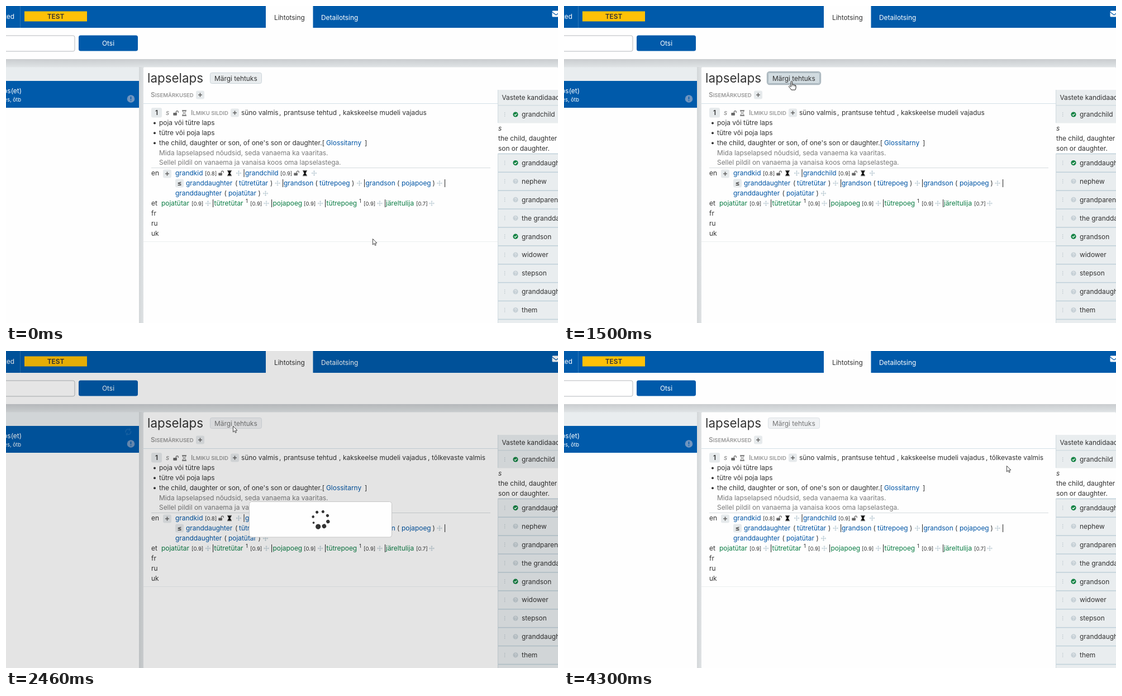
These frames come from a looping animation (988 px wide and 567 px high, 4.81 s). An HTML page:

```html
<!DOCTYPE html>
<html lang="et">
<head>
<meta charset="utf-8">
<title>Lapselaps</title>
<style>
html, body { margin: 0; width: 100%; height: 100%; overflow: hidden; background: #fefefe; }
svg { display: block; width: 100%; height: 100%; }
text { font: 11.9px Inter, sans-serif; fill: #333; white-space: pre; }
.sm { font-size: 9.52px; }
.b { font-weight: 600; }
.i { font-style: italic; }
.w { fill: #fff; }
.l { fill: #0055a5; }
.g { fill: #0b7d45; }
.m { fill: #7b7b7b; }
.cap { fill: #999; font-weight: 600; }
.h { font-size: 22.4px; }
.mid { text-anchor: middle; }
.end { text-anchor: end; }
</style>
</head>
<body>
<svg id="stage" viewBox="0 0 988 567">
  <defs>
    <linearGradient id="drop" x2="0" y2="1">
      <stop offset="0" stop-color="#c9cccf"/><stop offset="1" stop-color="#dfe3e5"/>
    </linearGradient>
    <linearGradient id="gap">
      <stop offset="0" stop-color="#d3d7d9"/><stop offset="1" stop-color="#dfe2e4"/>
    </linearGradient>
    <g id="move" fill="none" stroke="#b9cad3">
      <path d="M-4 0H4M0-4V4" stroke-width="1"/>
      <path d="M-3-1.3L-4.4 0-3 1.3M3-1.3L4.4 0 3 1.3M-1.3-3L0-4.4 1.3-3M-1.3 3L0 4.4 1.3 3"/>
    </g>
    <g id="unlock">
      <rect x="-4.7" y="-.6" width="6.6" height="4.8" rx=".8" fill="#666"/>
      <path d="M.4-.6V-2a1.9 1.9 0 0 1 3.8 0V-.4" fill="none" stroke="#666" stroke-width="1.2"/>
    </g>
    <g id="glass">
      <path d="M-4-4.6H4M-4 4.6H4" stroke="#666" stroke-width="1.4"/>
      <path d="M-3-4C-3-1-1-1-1 0S-3 1-3 4H3C3 1 1 1 1 0S3-1 3-4z" stroke="#666" stroke-width=".8"/>
    </g>
    <g id="plus">
      <rect x="-7.5" y="-7.5" width="15" height="15" rx="3" fill="#e6eaec"/>
      <path d="M-3.5 0H3.5M0-3.5V3.5" stroke="#666" stroke-width="1.7"/>
    </g>
    <g id="ok">
      <circle r="4.6" fill="#158345"/>
      <path d="M-2.2 .1L-.6 1.7 2.3-1.4" fill="none" stroke="#fff" stroke-width="1.3"/>
    </g>
    <g id="ask">
      <circle r="4.6" fill="#c6d0d6"/>
      <path d="M-1.4-1A1.4 1.4 0 1 1 .5 .2Q0 .4 0 1M0 1.9V2.9" fill="none" stroke="#eef1f3"/>
    </g>
    <g id="arrow"><path d="M.5 .5V11L3 8.6 4.6 12.3 6.3 11.6 4.7 8H8z" fill="#fff" stroke="#333" stroke-width=".9"/></g>
    <g id="hand">
      <path d="M-1.2 9V1.2Q-1.2 0 0 0T1.2 1.2V6Q3.2 5 3.8 6.6 5.6 5.9 6 7.2 7.6 7 7.6 8.6V11.5Q7.6 13.5 6.3 15.6H-.5Q-2.2 12.8-4.8 10.2-5.5 9-4.2 8.4-3 8-1.2 10z" fill="#fff" stroke="#222"/>
      <path d="M1.2 6V9M3.8 6.6V9M6 7.2V9.4" stroke="#222" stroke-width=".8"/>
    </g>
  </defs>
</svg>
<script>
const stage = document.getElementById('stage');
const out = [];
const add = s => out.push(s);
const rect = (x, y, w, h, fill, more = '') =>
  add(`<rect x="${x}" y="${y}" width="${w}" height="${h}" fill="${fill}" ${more}/>`);
const text = (x, y, s, cls = '', more = '') =>
  add(`<text x="${x}" y="${y}" class="${cls}" ${more}>${s}</text>`);
const use = (id, x, y, more = '') =>
  add(`<use href="#${id}" transform="translate(${x} ${y})" ${more}/>`);
const line = (x1, x2, y, c) => rect(x1, y, x2 - x1, 1, c);
const smallCaps = (x, y, s) =>
  text(x, y, `${s[0]}<tspan class="sm">${s.slice(1).toUpperCase()}</tspan>`, 'cap');

// One line of words: [kind, x, label]
const row = (y, parts) => parts.forEach(([kind, x, s]) => {
  if (kind === '|') rect(x, y - 11, 1.1, 14, '#333');
  else if (kind === 'move' || kind === 'unlock' || kind === 'glass') use(kind, x, y - 4);
  else if (kind === 'sup') text(x, y - 5, s, 'sm');
  else text(x, y, s, kind);
});

const BLUE = '#005aaa', PANEL = '#e9edef';

function header() {
  rect(0, 0, 988, 567, '#fefefe');
  rect(0, 0, 988, 39, BLUE);
  text(15, 23, 'Filtreeritud'.replace('itud', 'ted'), 'w end');
  rect(25, 0, 1, 39, '#2b76b8');
  rect(33, 9.5, 112, 18, '#ffc107');
  text(89, 23, 'TEST', 'b mid');
  rect(465, 0, 84.5, 39, '#fefefe');
  text(480, 25, 'Lihtotsing');
  text(564, 25, 'Detailotsing', 'w');
  rect(977.5, 8.5, 14, 11, '#fff', 'rx="1.5"');
  add(`<path d="M977 10.5L984.5 16 992 10.5" fill="none" stroke="${BLUE}" stroke-width="1.2"/>`);
  rect(-10, 53, 133, 28, '#fff', 'rx="3" stroke="#b4b8bb"');
  rect(130, 52.5, 106, 28, BLUE, 'rx="3.5"');
  text(183, 71, 'Otsi', 'w mid');
}

function side() {
  rect(0, 95, 988, 472, '#dfe3e5');
  rect(0, 95, 988, 14, 'url(#drop)');
  rect(0, 109.5, 238, 25, PANEL);
  rect(0, 134, 238, 48, BLUE);
  rect(0, 182, 238, 385, '#fefefe');
  rect(238, 109, 8, 458, 'url(#gap)');
  text(28, 156, 'lapselaps(et)', 'w end');
  text(27, 171, 'inimes, õtb', 'w sm end');
  add('<circle cx="223.5" cy="166" r="6.8" fill="#7095bf"/>');
  add(`<path d="M223.5 162V167M223.5 168.4V170" stroke="${BLUE}" stroke-width="1.6"/>`);
  add(`<g id="sync" fill="none" stroke="#fff" stroke-width="1.7">${[0, 180].map(a =>
    `<g transform="rotate(${a})"><path d="M-4.6-1A4.7 4.7 0 0 1 3.6-3"/>
     <path d="M5.6-5.4V-.8H1z" fill="#fff" stroke="none"/></g>`).join('')}</g>`);
}

function entry() {
  rect(246, 109.5, 742, 458, '#fefefe', 'rx="2"');
  text(253, 137, 'lapselaps', 'h');
  rect(364, 118, 95, 22, 'none', 'id="ring" rx="4" stroke="#adb9c0" stroke-width="2.4"');
  rect(365.5, 119.5, 92, 19, PANEL, 'id="btn" rx="3" stroke="#cbd4d9"');
  text(373, 133.5, 'Märgi tehtuks', '', 'id="label"');
  smallCaps(259, 162.5, 'Sisemärkused');
  use('plus', 347.5, 159);
  line(246, 880, 174, '#d3e0e7');

  rect(260, 182, 19, 17.5, '#e6eaec', 'rx="3"');
  text(269.5, 195, '1', 'b mid');
  text(286, 195, 's', 'i m');
  use('unlock', 304, 191.5);
  use('glass', 319, 191.5, 'fill="#ddd"');
  smallCaps(331, 195, 'Ilmiku sildid');
  use('plus', 409.5, 191);
  row(195, [['', 421, 'süno valmis'], ['', 489, ','], ['', 497, 'prantsuse tehtud'],
    ['', 596, ','], ['', 603, 'kakskeelse mudeli vajadus']]);
  add('<g id="tag">');
  row(195, [['', 755, ','], ['', 762, 'tõlkevaste valmis']]);
  add('</g>');

  ['poja või tütre laps', 'tütre või poja laps',
   "the child, daughter or son, of one's son or daughter.["].forEach((s, i) => {
    const y = 213 + i * 17.85;
    add(`<circle cx="266" cy="${y - 3.5}" r="2" fill="#333"/>`);
    text(274, y, s);
  });
  text(573, 248.7, 'Glossitarny', 'l');
  text(642, 248.7, ']');
  text(274, 266.5, 'Mida lapselapsed nõudsid, seda vanaema ka vaaritas.', 'm');
  text(274, 284.4, 'Sellel pildil on vanaema ja vanaisa koos oma lapselastega.', 'm');
  line(260, 867, 289, '#d6dbde');

  use('plus', 288.5, 300);
  row(303, [['', 260, 'en'], ['l', 303, 'grandkid'], ['sm', 356, '[0.8]'], ['unlock', 385],
    ['glass', 400], ['move', 416.5], ['|', 425.5], ['l', 428, 'grandchild'],
    ['sm', 491, '[0.9]'], ['unlock', 520], ['glass', 535], ['move', 551.5]]);
  rect(303, 309.5, 15, 15, '#e6eaec', 'rx="3"');
  text(310.5, 321, '≤', 'b mid');
  row(321, [['l', 322, 'granddaughter'], ['', 410, '('], ['l', 417, 'tütretütar'], ['', 473, ')'],
    ['move', 486], ['|', 495], ['l', 497, 'grandson'], ['', 553.5, '('], ['l', 561, 'tütrepoeg'],
    ['', 619, ')'], ['move', 632.5], ['|', 641], ['l', 643.5, 'grandson'], ['', 700, '('],
    ['l', 708, 'pojapoeg'], ['', 763.5, ')'], ['move', 776], ['|', 785]]);
  row(339.2, [['l', 303, 'granddaughter'], ['', 390.5, '('], ['l', 398, 'pojatütar'],
    ['', 451.5, ')'], ['move', 464.5]]);
  row(357, [['', 260, 'et'], ['g', 278, 'pojatütar'], ['sm', 332, '[0.9]'], ['move', 361.5],
    ['|', 370], ['g', 372.5, 'tütretütar'], ['sup', 429, '1'], ['sm', 437, '[0.9]'], ['move', 466],
    ['|', 475], ['g', 477.5, 'pojapoeg'], ['sm', 533, '[0.9]'], ['move', 562.5],
    ['|', 571], ['g', 573.5, 'tütrepoeg'], ['sup', 632, '1'], ['sm', 640, '[0.9]'], ['move', 669],
    ['|', 678], ['g', 680, 'järeltulija'], ['sm', 734, '[0.7]'], ['move', 762]]);
  ['fr', 'ru', 'uk'].forEach((s, i) => text(260, 374.6 + i * 18, s));
  line(246, 880, 421, '#eceff0');
}

function candidate(y, name, good) {
  for (const d of [-3, 0, 3]) rect(892, y + d - .7, 1.3, 1.4, '#bac5cb');
  use(good ? 'ok' : 'ask', 912, y);
  text(923, y + 4.3, name);
}

function candidates() {
  rect(880.5, 150, 108, 59.5, PANEL);
  text(887.5, 167.7, 'Vastete kandidaadid');
  line(880.5, 988, 177.3, '#c9d6dd');
  candidate(194, 'grandchild', true);
  text(881, 223, 's', 'i');
  text(881, 241, 'the child, daughter or');
  text(881, 259, 'son or daughter.');
  rect(880.5, 264, 108, 303, PANEL);
  ['granddaughter', 'nephew', 'grandparent', 'the granddaughter', 'grandson',
   'widower', 'stepson', 'granddaughter', 'them', ''].forEach((s, i) => {
    const y = 263.6 + i * 32.9;
    rect(880.5, y, 108, 1.5, '#bfd0d9');
    if (s) candidate(y + 17, s, i % 4 === 0 && i < 5);
  });
  rect(880, 150, 1, 59, '#cfdae0');
  rect(880, 264, 1, 303, '#cfdae0');
}

function loader() {
  add('<g id="loader">');
  rect(0, 0, 988, 567, '#000', 'opacity=".103"');
  rect(435.5, 269.5, 255, 63.5, '#fefefe', 'rx="4" stroke="#c6c6c6"');
  add('<g id="dots" fill="#333">');
  // clockwise from the right
  [1.9, 2.3, 2.5, 2.5, 2.6, 3.2, 3.8, 4.6].forEach((r, i) => {
    const a = i * Math.PI / 4;
    add(`<circle cx="${14 * Math.cos(a)}" cy="${14 * Math.sin(a)}" r="${r}"/>`);
  });
  add('</g></g>');
}

header();
side();
entry();
candidates();
loader();
add('<g id="cursor">');
use('arrow', 0, 0, 'id="point"');
use('hand', 0, 0, 'id="press"');
add('<g id="busy"><circle cx="9" cy="1" r="4.2" fill="#8fd0ee" stroke="#1f86cc" stroke-width="2.8"/></g></g>');
stage.insertAdjacentHTML('beforeend', out.join(''));

const $ = id => document.getElementById(id);
const show = (id, on) => $(id).setAttribute('visibility', on ? 'visible' : 'hidden');
const set = (id, attrs) => { for (const k in attrs) $(id).setAttribute(k, attrs[k]); };

const LOOP = 4810, CLICK = 1280, LOAD = 1610, REPLY = 1960, DONE = 2530, TICK = 70.8;

// Pointer positions: time, x, y
const path = [
  [0, 656, 416], [70, 706, 356], [140, 746, 290], [220, 762, 248],
  [420, 750, 244], [490, 690, 222], [560, 600, 193], [630, 512, 165], [700, 448, 146],
  [770, 416, 137], [840, 406, 134],
  [3100, 440, 143], [3170, 540, 172], [3250, 665, 206], [3320, 765, 231], [3400, 794, 238],
  [3650, 800, 230], [3720, 812, 212], [3790, 822, 190], [3860, 824, 172], [3930, 812, 168],
  [4000, 794, 180], [4070, 788, 200], [4140, 796, 211],
  [4240, 794, 208], [4300, 792, 205]
];

function draw(t) {
  const [, x, y] = path.findLast(p => p[0] <= t);
  const loading = t >= LOAD && t < DONE;
  const replied = t >= REPLY;
  const hover = t >= 770 && t < LOAD;
  const hand = t >= 970 && t < LOAD;

  set('cursor', { transform: `translate(${x} ${y})` });
  show('point', !hand);
  show('press', hand);
  set('press', { transform: 'translate(1.5 .5)' });
  show('busy', loading && !replied);

  set('btn', { fill: hover ? '#d1dbe0' : replied ? '#f0f2f4' : PANEL,
    stroke: hover ? '#aab8c0' : replied ? '#dbe1e5' : '#cbd4d9' });
  set('label', { opacity: replied ? .65 : 1 });
  set('ring', { opacity: t < CLICK || replied ? 0 : t < CLICK + 70 ? .5 : 1 });
  show('tag', replied);

  const spin = Math.floor((t - LOAD + 1) / TICK) * TICK * .18;
  show('loader', loading);
  show('sync', loading);
  set('dots', { transform: `translate(563 300.8) rotate(${spin})` });
  set('sync', { transform: `translate(218.8 144.5) rotate(${spin})`,
    opacity: replied ? Math.max(0, 1 - (t - REPLY) / 550) : 1 });
}

const start = performance.now();
function frame() {
  draw((performance.now() - start) % LOOP);
  requestAnimationFrame(frame);
}
draw(0);
requestAnimationFrame(frame);
</script>
</body>
</html>
```
